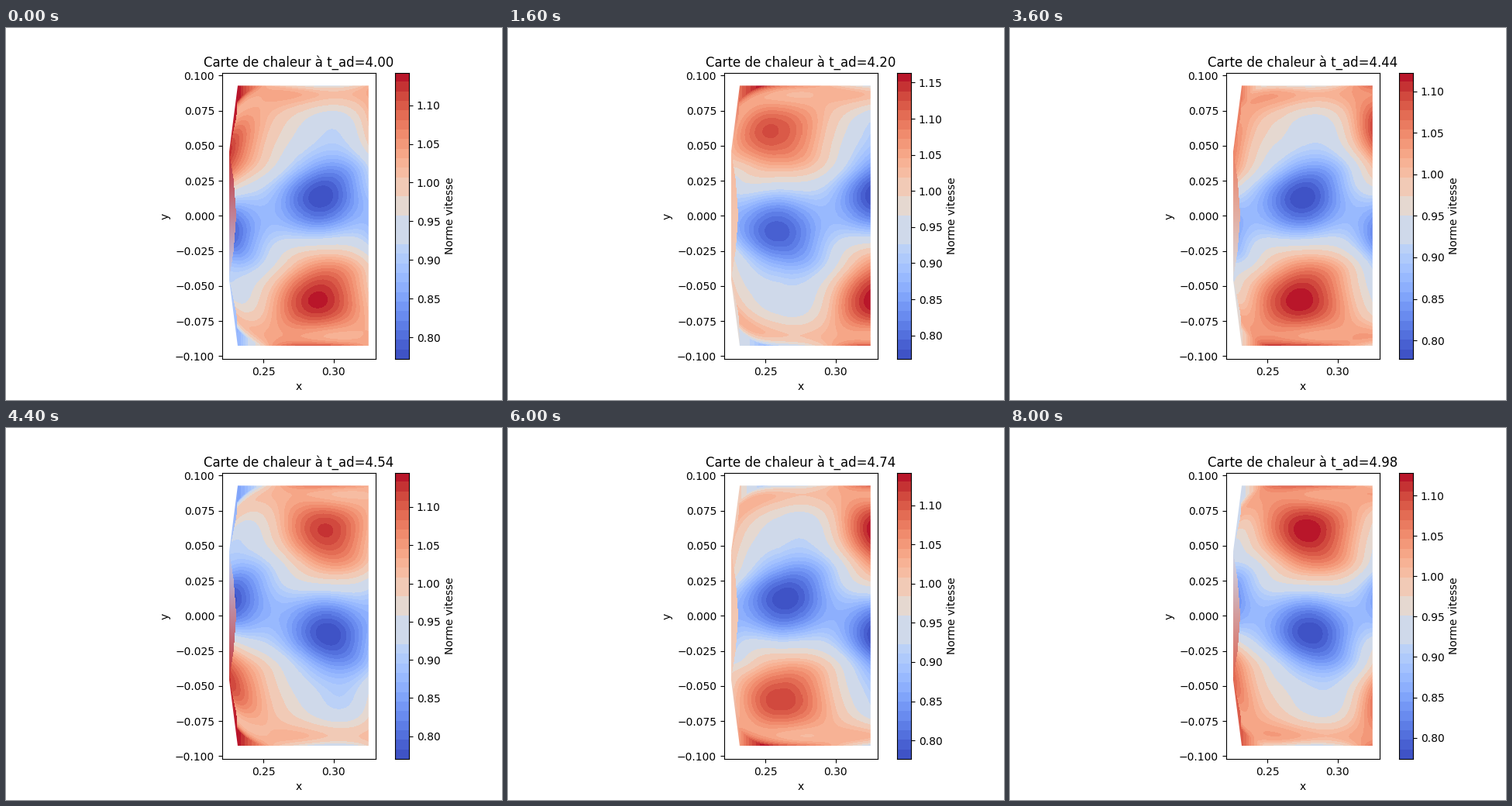
A matplotlib script for the animation above (8200 ms loop, 640 px wide and 480 px high).

```python
import numpy as np
import matplotlib.pyplot as plt
from matplotlib.animation import FuncAnimation
from matplotlib.patches import Polygon
from matplotlib.ticker import MultipleLocator

FRAMES, STEP_MS = 41, 200
WAVE = 0.144             # spacing of the vortices in one row
K = 2 * np.pi / WAVE
X0, ADVANCE = 0.289, 0.02315
BANDS = 30
LEFT, RIGHT, TOP = 0.2256, 0.325, 0.0928

# Harmonics of the speed across the wake: mean, first (odd), second (even)
heights = np.array([0, .012, .02, .03, .04, .05, .06, .075, .09])
mean = [.8375, .857, .885, .9325, .968, .999, 1.019, 1.022, 1.025]
first = np.array([-.0565, -.075, -.095, -.1, -.1025, -.0975, -.06, -.03])
second = [-.0375, -.028, -.02, -.0075, .0025, .009, .014, .0025, -.005]
u = (heights / .09) ** 2
mean_fit = np.polyfit(u, mean, 4)
first_fit = np.polyfit(u[1:], first / heights[1:], 4)
second_fit = np.polyfit(u, second, 4)

# Range of the colour scale over half a shedding cycle
cycle = [0, .0259, .0438, .0465, .0567, .0619]
highs = [1.142, 1.1564, 1.165, 1.1416, 1.1224, 1.1283]
lows = [.772, .7627, .768, .7762, .7776, .7735]

cmap = plt.get_cmap("coolwarm")
shade = np.arange(BANDS) + 0.5
shade[12:15], shade[15:17], shade[17:19] = 13.5, 16, 18
colors = cmap(shade / BANDS)[:, :3]


def speed(x, y, pos):
    """Speed of the vortex street whose lower vortex is at pos."""
    y = np.clip(y * (1 + .33 * np.exp(-(x - .225) / .01)), -.095, .095)
    w = (y / .09) ** 2
    gain = np.interp(x, [.225, .24, .26, .285, .325], [1.1, .95, .87, 1, 1.25])
    lean = .005 * np.exp(-((np.abs(y) - .035) / .012) ** 2)
    a = K * (x - pos - lean)
    skew = -.01 * np.minimum(1, (y / .06) ** 2)
    return (np.polyval(mean_fit, w)
            + gain * y * np.polyval(first_fit, w) * np.cos(a)
            + np.polyval(second_fit, w) * np.cos(2 * a)
            + skew * np.sin(2 * a))


nx, ny = 180, 336
xs = LEFT + (np.arange(nx) + .5) / nx * (RIGHT - LEFT)
ys = -TOP + (np.arange(ny) + .5) / ny * 2 * TOP
gx, gy = np.meshgrid(xs, ys)

# Curved inner border; left of it long thin triangles fill the hull
border_y = [0, .025, .045, .07, TOP]
border_x = [.2306, .2288, LEFT, .2308, .2318]
strip = gx < np.interp(np.abs(gy), border_y, border_x)
corner_x = np.array([.2318, LEFT, LEFT, .2318])
corner_y = np.array([-TOP, -.045, .045, TOP])


def picture(pos, lo, hi):
    v = speed(gx, gy, pos)
    vmin, vmax = v[~strip].min(), v[~strip].max()
    z = (v - vmin) / (vmax - vmin)
    rgb = colors[np.clip((z * BANDS).astype(int), 0, BANDS - 1)]
    ends = (speed(corner_x, corner_y, pos) - vmin) / (vmax - vmin)
    ends = cmap(np.clip(ends, 0, 1))
    blend = np.stack([np.interp(ys, corner_y, ends[:, c]) for c in range(3)], -1)
    rgb[strip] = np.broadcast_to(blend[:, None], rgb.shape)[strip]
    return rgb


fig = plt.figure(figsize=(6.4, 4.8), dpi=100)
ax = fig.add_axes([278.8 / 640, .11, 198 / 640, .77])
cax = fig.add_axes([501.6 / 640, .11, 18.48 / 640, .77])

heat = ax.imshow(np.ones((ny, nx, 3)), extent=(LEFT, RIGHT, -TOP, TOP),
                 origin="lower", aspect="auto", interpolation="nearest")
hull = np.r_[np.c_[corner_x, corner_y], [(RIGHT, TOP), (RIGHT, -TOP)]]
heat.set_clip_path(Polygon(hull, transform=ax.transData))
ax.set(xlim=(.22063, .32997), ylim=(-.10205, .10205), xlabel="x", ylabel="y")
ax.xaxis.set_major_locator(MultipleLocator(.05))
ax.yaxis.set_major_locator(MultipleLocator(.025))
title = ax.set_title("")

scale = cax.imshow(colors[:, None], extent=(0, 1, 0, 1), origin="lower",
                   aspect="auto", interpolation="nearest")
cax.set_xticks([])
cax.yaxis.tick_right()
cax.yaxis.set_label_position("right")
cax.yaxis.set_major_locator(MultipleLocator(.05))
cax.set_ylabel("Norme vitesse")


def update(i):
    pos = X0 + ADVANCE * i
    phase = (pos - X0) % (WAVE / 2)
    lo = np.interp(phase, cycle, lows, period=WAVE / 2)
    hi = np.interp(phase, cycle, highs, period=WAVE / 2)
    heat.set_data(picture(pos, lo, hi))
    scale.set_extent((0, 1, lo, hi))
    cax.set_ylim(lo, hi)
    title.set_text(f"Carte de chaleur à t_ad={4 + .02 * round(1.225 * i):.2f}")
    return heat, scale, title


anim = FuncAnimation(fig, update, frames=FRAMES, interval=STEP_MS,
                     repeat=True, repeat_delay=0, blit=False)
plt.show()
```
